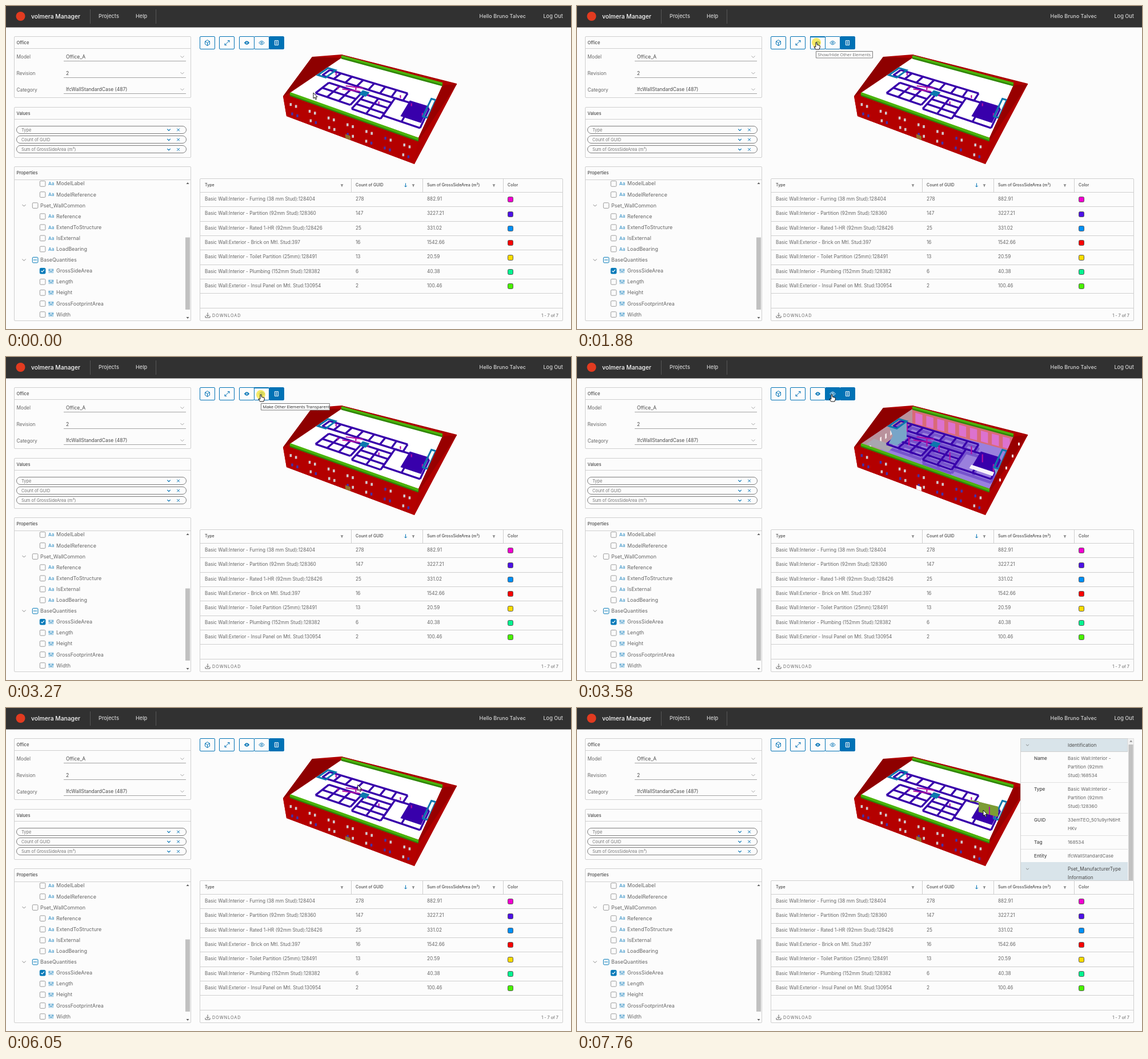
An HTML page with a canvas that plays this animation: 989 px wide and 566 px high, repeating every 8 s.

```html
<!DOCTYPE html>
<html lang="en">
<head>
<meta charset="utf-8">
<title>Model manager</title>
<style>
html, body { margin: 0; width: 100%; height: 100%; overflow: hidden; background: #fcfcfc; }
canvas { display: block; }
</style>
</head>
<body>
<canvas id="stage" width="989" height="566"></canvas>
<script>
const c = document.getElementById('stage').getContext('2d');
const LOOP = 8000, BLUE = '#0072b5', INK = '#666666', DARK = '#4a4a4a', RULE = '#cfcfcf', PAPER = '#fcfcfc';
const HIDDEN = 0, CLEAR = 1, FULL = 2;

// ---- helpers ----
function text(s, x, y, size, color = INK, weight = 400, o = {}) {
  c.font = `${weight} ${size}px ${o.font || 'Inter'}, sans-serif`;
  c.letterSpacing = (o.gap || 0) + 'px';
  c.textAlign = o.align || 'left';
  c.fillStyle = color;
  c.fillText(s, x, y + size * 0.35);
}
function rect(x, y, w, h, fill, stroke, r = 0) {
  c.beginPath();
  c.roundRect(x, y, w, h, r);
  if (fill) { c.fillStyle = fill; c.fill(); }
  if (stroke) { c.strokeStyle = stroke; c.lineWidth = 1; c.stroke(); }
}
function trace(pts, closed) {
  c.beginPath();
  pts.forEach(([x, y]) => c.lineTo(x, y));
  if (closed) c.closePath();
}
function line(pts, color, w = 1, closed = false) {
  trace(pts, closed);
  c.strokeStyle = color;
  c.lineWidth = w;
  c.stroke();
}
function poly(pts, fill) {
  trace(pts, true);
  c.fillStyle = fill;
  c.fill();
}
function disc(x, y, r, fill) {
  c.beginPath();
  c.arc(x, y, r, 0, 7);
  c.fillStyle = fill;
  c.fill();
}
const times = (n, f) => Array.from({ length: n }, (_, i) => f(i));
const hline = (x0, x1, y, color = RULE) => line([[x0, y], [x1, y]], color);
const vline = (x, y0, y1, color = RULE) => line([[x, y0], [x, y1]], color);
const chevron = (x, y, color, s = 3, w = 1) =>
  line([[x - s, y - s / 2], [x, y + s / 2], [x + s, y - s / 2]], color, w);
const arrowhead = (x, y, dir, color = '#606060') =>
  poly([[x - 2.5, y - dir], [x + 2.5, y - dir], [x, y + 2 * dir]], color);
const mix = (a, b, k) => a + (b - a) * k;
const within = (t, a, b) => t >= a && t < b;
const clamp = k => Math.max(0, Math.min(1, k));

// ---- page ----
function header() {
  rect(0, 0, 989, 37.5, '#313131');
  disc(25.5, 18, 8, '#e23b20');
  text('volmera Manager', 44, 18, 10.3, '#fafafa', 500);
  [147.5, 262.5].forEach(x => vline(x, 6, 31, '#565656'));
  text('Projects', 162, 18, 9.2, '#d2d2d2', 500);
  text('Help', 227, 18, 9.2, '#d2d2d2', 500);
  text('Hello Bruno Talvec', 910, 18, 9.1, '#d2d2d2', 500, { align: 'right' });
  text('Log Out', 975, 18, 9.2, '#d2d2d2', 500, { align: 'right' });
}

function card(y, h, title, rule) {
  rect(14.5, y + 0.5, 309, h, null, RULE, 1.5);
  hline(15, 323, rule + 0.5);
  text(title, 18.5, y + 11, 7.5, DARK, 500);
}

function filters() {
  card(53, 107, 'Office', 74);
  [['Model', 'Office_A'], ['Revision', '2'], ['Category', 'IfcWallStandardCase (487)']].forEach(([k, v], i) => {
    const y = 89 + i * 28.6;
    text(k, 18.5, y + 0.5, 8.3);
    text(v, 105, y, 8.5, DARK);
    hline(101, 315, Math.round(y + 7) + 0.5, '#a4a4a4');
    chevron(308.5, y, '#9a9a9a', 3, 0.9);
  });
  card(177, 88, 'Values', 198);
  ['Type', 'Count of GUID', 'Sum of GrossSideArea (m³)'].forEach((s, i) => {
    const y = 217 + i * 17.2;
    rect(18.5, Math.round(y - 6) - 0.5, 297, 13, null, '#7c7c7c', 6.5);
    text(s, 27, y, 7.35, '#757575');
    chevron(285, y, BLUE, 2.7, 1.2);
    [-1, 1].forEach(d => line([[299.3, y - 2.3 * d], [303.9, y + 2.3 * d]], BLUE));
  });
}

const TREE = `text ModelLabel,text ModelReference,group Pset_WallCommon,text Reference,
text ExtendToStructure,text IsExternal,text LoadBearing,group BaseQuantities some,
number GrossSideArea on,number Length,number Height,number GrossFootprintArea,number Width`
  .split(',').map(s => s.trim().split(' '));

function checkbox(x, y, state) {
  rect(x - 4.7, y - 4.7, 9.6, 9.6, state === 'on' ? '#0079b8' : PAPER, state ? '#0079b8' : '#9a9a9a', 1.5);
  if (state === 'on') line([[x - 2.6, y], [x - 0.7, y + 2], [x + 3, y - 2.2]], '#ffffff', 1.3);
  if (state === 'some') hline(x - 3, x + 3, y, '#0079b8');
}

function tree() {
  card(281, 270, 'Properties', 304);
  c.save();
  c.beginPath();
  c.rect(15, 305, 308, 246);
  c.clip();
  TREE.forEach(([kind, label, state], i) => {
    const y = 311.3 + i * 19.1, group = kind === 'group';
    checkbox(group ? 51 : 64, y, state);
    if (group) chevron(31.5, y, '#777777', 3, 0.9);
    if (kind === 'text') text('Aa', 74, y, 8, '#3a94c8', 500);
    if (kind === 'number') times(3, k => {
      const x = 75.7 + k * 3.1;
      vline(x, y - 4, y + 4, '#3a94c8');
      rect(x - 1.3, y + (k === 1 ? 0.6 : -2.2), 2.6, 1.6, '#3a94c8');
    });
    text(label, group ? 60 : 88, y, 9, INK);
  });
  c.restore();
  rect(314, 405.5, 8, 126.5, '#c1c1c1');
  arrowhead(318, 311, -1);
  arrowhead(318, 546, 1);
}

const ROWS = [
  ['Interior - Furring (38 mm Stud):128404', '278', '882.91', '#f400d0'],
  ['Interior - Partition (92mm Stud):128360', '147', '3227.21', '#4d10e6'],
  ['Interior - Rated 1-HR (92mm Stud):128426', '25', '331.02', '#0090ff'],
  ['Exterior - Brick on Mtl. Stud:397', '16', '1542.66', '#ff0000'],
  ['Interior - Toilet Partition (25mm):128491', '13', '20.59', '#ffdc00'],
  ['Interior - Plumbing (152mm Stud):128382', '6', '40.38', '#00f490'],
  ['Exterior - Insul Panel on Mtl. Stud:130954', '2', '100.46', '#48f400']
];
const HEADS = ['Type', 'Count of GUID', 'Sum of GrossSideArea (m³)', 'Color'];
const COLS = [348, 612, 737, 878];

function table() {
  rect(339.5, 302.5, 635, 249, null, RULE, 1.5);
  HEADS.forEach((s, i) => {
    text(s, COLS[i], 314, 7.05, DARK, 500);
    if (!i) return;
    const x = COLS[i] - 7.5;
    vline(x, 303, 326);
    arrowhead(x - 16.5, 313.5, 1, '#777777');
    vline(x - 16.5, 314, 317, '#777777');
  });
  vline(699.5, 310.5, 317, BLUE);
  chevron(699.5, 316, BLUE, 2.2);
  hline(340, 974, 326.5);
  ROWS.forEach(([name, count, area, color], i) => {
    const y = 338.2 + i * 25.33;
    ['Basic Wall:' + name, count, area].forEach((s, k) => text(s, COLS[k], y, 8.24));
    rect(878.5, Math.round(y - 4) + 0.5, 9, 9, color, '#555555', 2);
    hline(340, 974, Math.round(y + 13) + 0.5);
  });
  hline(340, 974, 529.5);
  vline(353, 537.5, 543.5, INK);
  chevron(353, 542.6, INK, 2.6);
  line([[349, 543], [349, 546], [357, 546], [357, 543]], INK);
  text('DOWNLOAD', 361, 542, 7.2, INK, 400, { gap: 1 });
  text('1 - 7 of 7', 967, 542, 7.3, INK, 400, { align: 'right' });
}

// ---- toolbar ----
function eye(x, y, solid, color, pupil) {
  c.beginPath();
  c.moveTo(x - 4.6, y);
  c.quadraticCurveTo(x, y - 6.4, x + 4.6, y);
  c.quadraticCurveTo(x, y + 6.4, x - 4.6, y);
  c.strokeStyle = c.fillStyle = color;
  c.lineWidth = 1;
  if (solid) c.fill(); else c.stroke();
  disc(x, y, 1.8, solid ? pupil : color);
  disc(x, y, 0.9, solid ? color : pupil);
}

function toolbar(mode, pressed) {
  const button = (x, on) => rect(x + 0.5, 53.5, 26, 22, on ? BLUE : PAPER, BLUE, 1.5);
  const colors = on => on ? ['#ffffff', BLUE] : [BLUE, PAPER];
  button(339);
  const hex = times(6, k => [352.5 + 4.6 * Math.sin(k * Math.PI / 3), 64.5 - 5 * Math.cos(k * Math.PI / 3)]);
  line(hex, BLUE, 1, true);
  [1, 3, 5].forEach(k => line([[352.5, 64.5], hex[k]], BLUE));
  button(373);
  line([[383, 68.5], [391, 60.5]], BLUE);
  [-1, 1].forEach(d => {
    const x = 387 + 4 * d, y = 64.5 - 4 * d;
    line([[x - 3.2 * d, y], [x, y], [x, y + 3.2 * d]], BLUE);
  });
  button(408, mode === FULL);
  eye(421.5, 64.5, true, ...colors(mode === FULL));
  button(434, mode === CLEAR);
  eye(447.5, 64.5, false, ...colors(mode === CLEAR));
  button(460, true);
  rect(470.5, 60.5, 6, 8, null, '#ffffff');
  times(3, k => hline(472, 475, 62.5 + 2 * k, '#d8eaf5'));
  if (pressed) rect(pressed, 53, 26, 2, BLUE);
}

// ---- building: everything sits on a few corner points ----
const ROOF = [[587, 91], [764, 139], [722, 231], [497, 152]];
const FRONT = [[485, 158], [720, 240], [715, 277], [491, 193]];
const PEAK_L = [536, 89], PEAK_R = [789, 137];
const GREEN = '#4ab40c', MOSS = '#2e8608', PLAN = '#3800ab', PINK = '#b010a4', TEAL = '#0b78ae';

function at([a, b, d, e], u, v) {
  return [0, 1].map(i => mix(mix(a[i], b[i], u), mix(e[i], d[i], u), v));
}
const patch = (q, u0, v0, u1, v1) => [at(q, u0, v0), at(q, u1, v0), at(q, u1, v1), at(q, u0, v1)];
const drop = ([x, y], h) => [x, y + h];
const hang = (a, b, h) => [a, b, drop(b, h), drop(a, h)];

// u0, v0, u1, v1, columns, rows
const ROOMS = [
  [.04, .31, .75, .46, 7, 1], [.14, .56, .42, .84, 3, 2], [.45, .56, .68, .9, 2, 3], [.68, .46, .98, .83, 2, 1]
];

function rooms(color, w) {
  ROOMS.forEach(([u0, v0, u1, v1, n, m]) => {
    const q = patch(ROOF, u0, v0, u1, v1);
    times(n + 1, i => line([at(q, i / n, 0), at(q, i / n, 1)], color, w));
    times(m + 1, j => line([at(q, 0, j / m), at(q, 1, j / m)], color, w));
  });
}

function seeded(n) {
  const s = Math.sin(n * 12.9898) * 43758.5453;
  return s - Math.floor(s);
}

function shell(full) {
  const [a, b, , d] = ROOF, back = hang(a, b, 27), left = hang(a, d, 34);
  poly(back, full ? '#a8000a' : '#d96a78');
  times(9, i => poly(patch(back, .03 + i * .108, .2, .1 + i * .108, .9), full ? PINK : '#dc72cf'));
  poly(left, full ? '#a00008' : '#b9929c');
  times(7, i => poly(patch(left, .3 + i * .1, .35, .33 + i * .1, .6), '#f3eaea'));
  c.save();
  c.translate(0, 6);
  rooms(full ? '#2a0088' : '#7654cc', 5);
  c.restore();
  poly(patch(ROOF, .03, .82, .2, .97), full ? '#f4eff4' : '#a9a6b0');
}

function interior(mode) {
  const full = mode === FULL, open = mode !== HIDDEN;
  c.save();
  trace(ROOF, true);
  c.clip();
  poly(ROOF, open ? full ? '#3a08ad' : '#9a80dd' : '#ffffff');
  if (open) shell(full);
  rooms(full ? '#3f0cba' : PLAN, full ? 1.5 : 3.4);
  poly(patch(ROOF, .8, .42, .97, .74), PLAN);
  if (open) poly(patch(ROOF, .79, .7, .98, .77), '#f8f4fb');
  times(8, i => {
    const [x, y] = at(ROOF, .1 + i * .12, .3 + .5 * seeded(i + 2));
    rect(x, y, 2.2, open ? 14 : 5, PINK);
  });
  [.52, .6].forEach(v => line([at(ROOF, .27, v), at(ROOF, .4, v - .06)], PINK, 2));
  poly(patch(ROOF, .41, .5, .47, .6), TEAL);
  const lift = patch(ROOF, .01, .28, .08, .48), shaft = patch(ROOF, .96, .28, 1, .62);
  if (open) [lift, shaft].forEach(q => poly(hang(q[3], q[2], 30).concat(hang(q[2], q[1], 30)), full ? '#146d9c' : '#78a5c8'));
  line(lift, TEAL, 3, true);
  line(shaft, TEAL, 3, true);
  c.restore();
}

function openings(open) {
  times(28, n => {
    const i = n >> 2, pair = n & 1, row = n >> 1 & 1;
    const [x, y] = at(FRONT, .05 + i * .143 + pair * .04, .3 + row * .47);
    const fill = seeded(n + 5) < (open ? .55 : .35) ? '#4630a6' : '#d2c8ce';
    rect(x - 1.8, y - 2.5, 3.6, 5, fill);
  });
  poly(patch(FRONT, .46, .8, .5, 1), open ? PAPER : '#93702a');
  if (open) times(4, i => {
    const x = mix(772, 739, i / 3), y = mix(150, 213, i / 3);
    rect(x, y, 3, 5, '#f3eaea');
  });
}

function building(mode) {
  const [a, b, d, e] = ROOF;
  poly([FRONT[0], PEAK_L, drop(a, -6), PEAK_R, FRONT[2], FRONT[3]], '#b00000');
  poly([FRONT[0], PEAK_L, a, e], '#8e0000');
  poly([b, PEAK_R, FRONT[1], d], '#980000');
  interior(mode);
  line([drop(a, -5), PEAK_R], '#a80000', 2);
  line([a, b], MOSS, 3);
  line([drop(a, -3), drop(b, -3)], GREEN, 3.5);
  poly(FRONT, '#b40000');
  line([drop(e, 4), drop(d, 5)], MOSS, 3);
  line([drop(e, 1), drop(d, 2)], GREEN, 4);
  openings(mode !== HIDDEN);
}

function picked() {
  const [a, b] = [at(ROOF, .78, .42), at(ROOF, .95, .4)];
  line([at(ROOF, .71, .45), a], '#6f8f2c', 2);
  poly(hang(a, b, 18), '#7c9c34');
  rect(721, 173, 2, 14, PINK);
}

// ---- details panel ----
const DETAILS = [
  ['Name', 'Basic Wall:Interior -|Partition (92mm|Stud):168534'],
  ['Type', 'Basic Wall:Interior -|Partition (92mm|Stud):128360'],
  ['GUID', '33emTEO_501u9yrN6Ht|HKv'], ['Tag', '168534'], ['Entity', 'IfcWallStandardCase']
];

function details(ready) {
  const tint = '#d9e4ea', step = 15, gap = 9;
  if (ready) rect(776.5, 53.5, 198, 248.5, PAPER, RULE);
  rect(776.5, 53.5, ready ? 187.5 : 198, 23, tint, RULE);
  chevron(788.5, 65, '#777777', 2.4, 0.9);
  text('Identification', 859, 65, 8.2, DARK);
  if (!ready) return;
  let y = 88;
  DETAILS.forEach(([k, v]) => {
    const lines = v.split('|');
    text(k, 800, y, 8.2, DARK, 500);
    lines.forEach((s, i) => text(s, 859, y + i * step, 8.2));
    y += lines.length * step + gap;
    hline(777, 964, Math.round(y - 12) + 0.5, '#e0e0e0');
  });
  rect(777, 270, 187, 32, tint);
  chevron(788.5, 282, '#777777', 2.4, 0.9);
  ['Pset_ManufacturerType', 'Information'].forEach((s, i) => text(s, 859, 282 + i * step, 8.3, DARK));
  rect(964.5, 53.5, 10, 248.5, '#f1f1f1');
  arrowhead(969.7, 58.5, -1, '#888888');
  rect(965.5, 64, 8, 238, '#c1c1c1');
}

// ---- pointer ----
// start, duration, x, y, ease-out power
const MOVES = [
  [80, 460, 411, 61, 1.6], [540, 150, 419, 70, 1], [1470, 1, 419, 64, 1],
  [2720, 320, 446, 66, 1.6], [5660, 770, 693, 166, 1.64], [6510, 150, 711, 179, 1]
];

function pointer(t) {
  let x = 538, y = 152;
  MOVES.forEach(([start, time, x1, y1, power]) => {
    const k = 1 - (1 - clamp((t - start) / time)) ** power;
    x = mix(x, x1, k);
    y = mix(y, y1, k);
  });
  return [x, y];
}

const HAND = [[-1, 0], [1, 0], [1.2, 4], [6, 5.2], [6.4, 8], [5, 12], [-1.4, 12], [-4.2, 7.4], [-1.2, 8]];
const ARROW = [[0, 0], [0, 10], [2.3, 8], [4, 11.8], [5.7, 11], [4.1, 7.4], [7, 7.2]];

function cursor(x, y) {
  const hand = within(x, 407, 487) && within(y, 53, 76);
  const pts = (hand ? HAND : ARROW).map(([a, b]) => [x + a, y + b]);
  poly(pts, '#ffffff');
  line(pts, '#111111', 1, true);
}

function tooltip(s, x, y, w, alpha, color) {
  c.globalAlpha = clamp(alpha);
  rect(x + 0.5, y + 0.5, w, 11.5, '#ffffff', '#7a7a7a');
  text(s, x + 3.5, y + 6.2, 7.35, color, 400, { font: '"Open Sans"' });
  c.globalAlpha = 1;
}

// ---- timeline ----
const CLICKS = [[1710, 2030], [2340, 2490], [3190, 3500], [5050, 5200], [6970, 7120]];

function draw(t) {
  const mode = within(t, 1950, 2490) ? FULL : within(t, 3430, 5130) ? CLEAR : HIDDEN;
  const pressed = within(t, 1710, 1950) ? 408 : within(t, 3190, 3430) ? 434 : 0;
  const [x, y] = pointer(t);
  rect(0, 0, 989, 566, PAPER);
  header();
  filters();
  tree();
  table();
  building(mode);
  if (t >= 7120) {
    picked();
    details(t >= 7760);
  }
  toolbar(mode, pressed);
  tooltip('Show/Hide Other Elements', 418, 79, 99, Math.min((t - 1050) / 270, (2030 - t) / 150), '#6a6a6a');
  tooltip('Make Other Elements Transparent', 446, 81, 120, t < 3190 ? 0 : (3580 - t) / 150, '#222222');
  if (CLICKS.some(([a, b]) => within(t, a, b))) disc(x, y, 8, 'rgba(243,224,32,.68)');
  cursor(x, y);
}

function frame(now) {
  draw(now % LOOP);
  requestAnimationFrame(frame);
}
requestAnimationFrame(frame);
</script>
</body>
</html>
```
